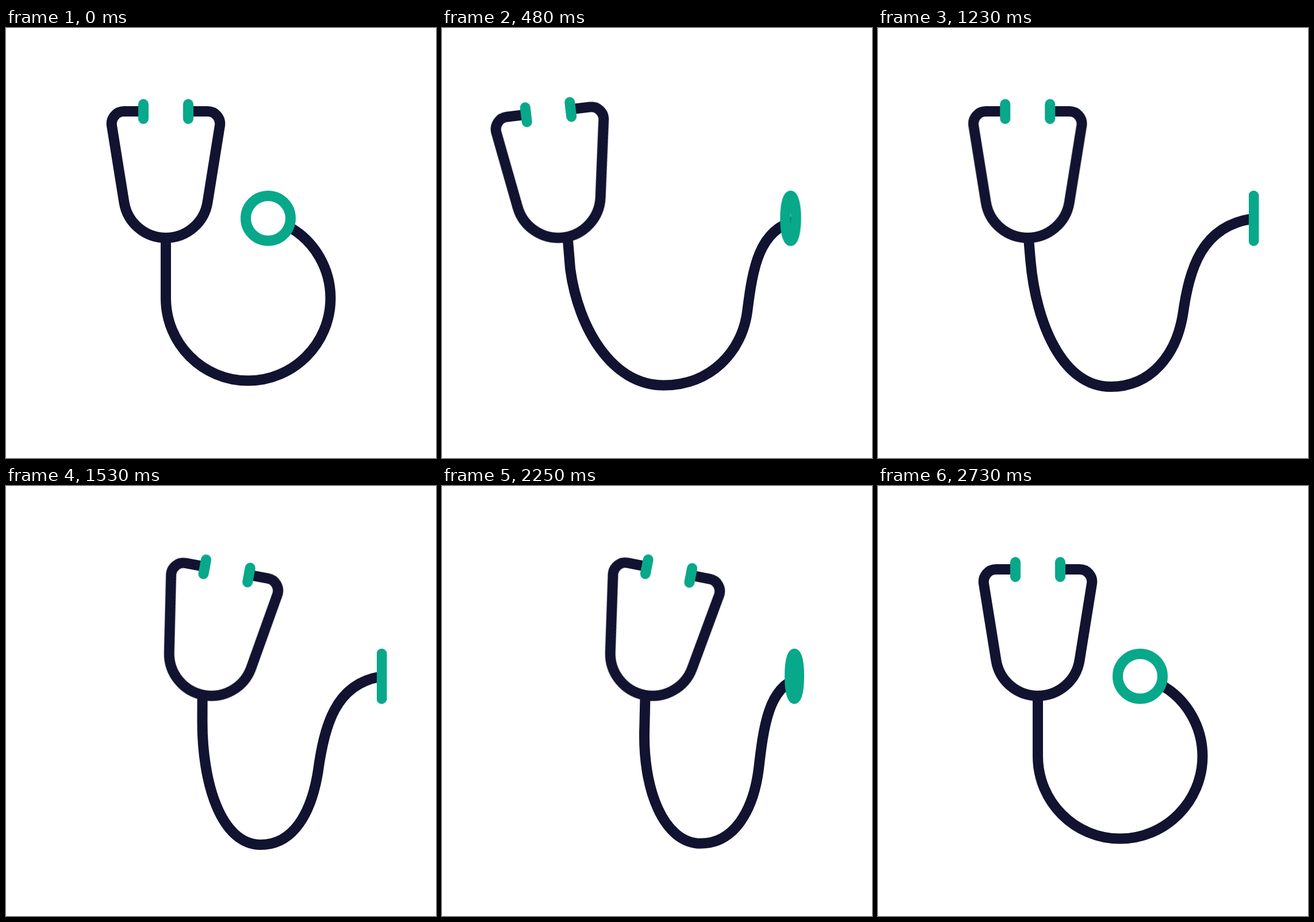
An HTML page that plays this animation: 748x748 px, repeating every 3240 ms.

```html
<!DOCTYPE html>
<html lang="en">
<head>
<meta charset="utf-8">
<title>Stethoscope</title>
<style>
  html, body { margin: 0; height: 100%; overflow: hidden; background: #fff; }
  svg { display: block; width: 100%; height: 100%; }

  path {
    fill: none;
    stroke: #121331;
    stroke-width: 18;
    stroke-linecap: round;
    stroke-linejoin: round;
  }
  .accent { stroke: #08a88a; }

  .head, .hose, .disc, .ring { animation: 3240ms linear infinite; }
  .head { animation-name: sway; transform-origin: 278px 291.5px; }
  .hose { animation-name: bend; }
  .disc { animation-name: slide; }
  .ring { animation-name: turn; }

  /* Rest, swing left at 900 ms, right at 1980 ms, rest again at 2730 ms. */
  @keyframes sway {
    0% { transform: translateX(0) rotate(0deg); animation-timing-function: cubic-bezier(.333, 0, .333, 1); }
    27.778% { transform: translateX(-99.5px) rotate(-8.9deg); animation-timing-function: cubic-bezier(.36, 0, .25, 1); }
    61.111% { transform: translateX(111px) rotate(14deg); animation-timing-function: cubic-bezier(.66, 0, .26, 1); }
    84.259%, 100% { transform: translateX(0) rotate(0deg); }
  }

  @keyframes bend {
    0% {
      d: path("M278 365L278 470C278 549 342 613.5 421 613.5C500 613.5 564.5 549 564.5 470C564.5 418.7 537 372 495 347.5");
      animation-timing-function: cubic-bezier(.333, 0, .333, 1);
    }
    27.778% {
      d: path("M200 365L206 404C224 512 280 624 375 624C456 624 510 568 521 497C533 418 556 345 650 332");
      animation-timing-function: cubic-bezier(.333, 0, .333, 1);
    }
    61.111% {
      d: path("M373 365L371.5 404C366 521 396.5 624 458 624C510 624 536 568 547.5 497C558 418 576.5 345 650 332");
      animation-timing-function: cubic-bezier(.66, 0, .26, 1);
    }
    84.259%, 100% {
      d: path("M278 365L278 470C278 549 342 613.5 421 613.5C500 613.5 564.5 549 564.5 470C564.5 418.7 537 372 495 347.5");
    }
  }

  @keyframes slide {
    0% { transform: translateX(456px); animation-timing-function: cubic-bezier(.333, 0, .333, 1); }
    27.778% { transform: translateX(653.5px); }
    61.111% { transform: translateX(653.5px); animation-timing-function: cubic-bezier(.66, 0, .26, 1); }
    84.259%, 100% { transform: translateX(456px); }
  }

  /* The ring narrows to a line while its stroke keeps its width. */
  @keyframes turn {
    0% {
      d: path("M0 292C21.5 292 39 309.5 39 331C39 352.5 21.5 370 0 370C-21.5 370 -39 352.5 -39 331C-39 309.5 -21.5 292 0 292Z");
      animation-timing-function: cubic-bezier(.333, 0, .333, 1);
    }
    27.778% {
      d: path("M0 292C0 292 0 309.5 0 331C0 352.5 0 370 0 370C0 370 0 352.5 0 331C0 309.5 0 292 0 292Z");
    }
    61.111% {
      d: path("M0 292C0 292 0 309.5 0 331C0 352.5 0 370 0 370C0 370 0 352.5 0 331C0 309.5 0 292 0 292Z");
      animation-timing-function: cubic-bezier(.66, 0, .26, 1);
    }
    84.259%, 100% {
      d: path("M0 292C21.5 292 39 309.5 39 331C39 352.5 21.5 370 0 370C-21.5 370 -39 352.5 -39 331C-39 309.5 -21.5 292 0 292Z");
    }
  }
</style>
</head>
<body>
<svg viewBox="0 0 748 748">
  <path class="hose" d="M278 365L278 470C278 549 342 613.5 421 613.5C500 613.5 564.5 549 564.5 470C564.5 418.7 537 372 495 347.5"/>
  <g class="head">
    <path d="M239 145H205.2A21.5 21.5 0 0 0 184 169.8L205.4 303A73.5 73.5 0 0 0 350.6 303L372 169.8A21.5 21.5 0 0 0 350.8 145H317"/>
    <path class="accent" d="M239 132.5V158M317 132.5V158"/>
  </g>
  <g class="disc">
    <path class="accent ring" d="M0 292C21.5 292 39 309.5 39 331C39 352.5 21.5 370 0 370C-21.5 370 -39 352.5 -39 331C-39 309.5 -21.5 292 0 292Z"/>
    <!-- Keeps the tips round when the ring is edge-on. -->
    <path class="accent" d="M0 292h.01M0 370h.01"/>
  </g>
</svg>
</body>
</html>
```
